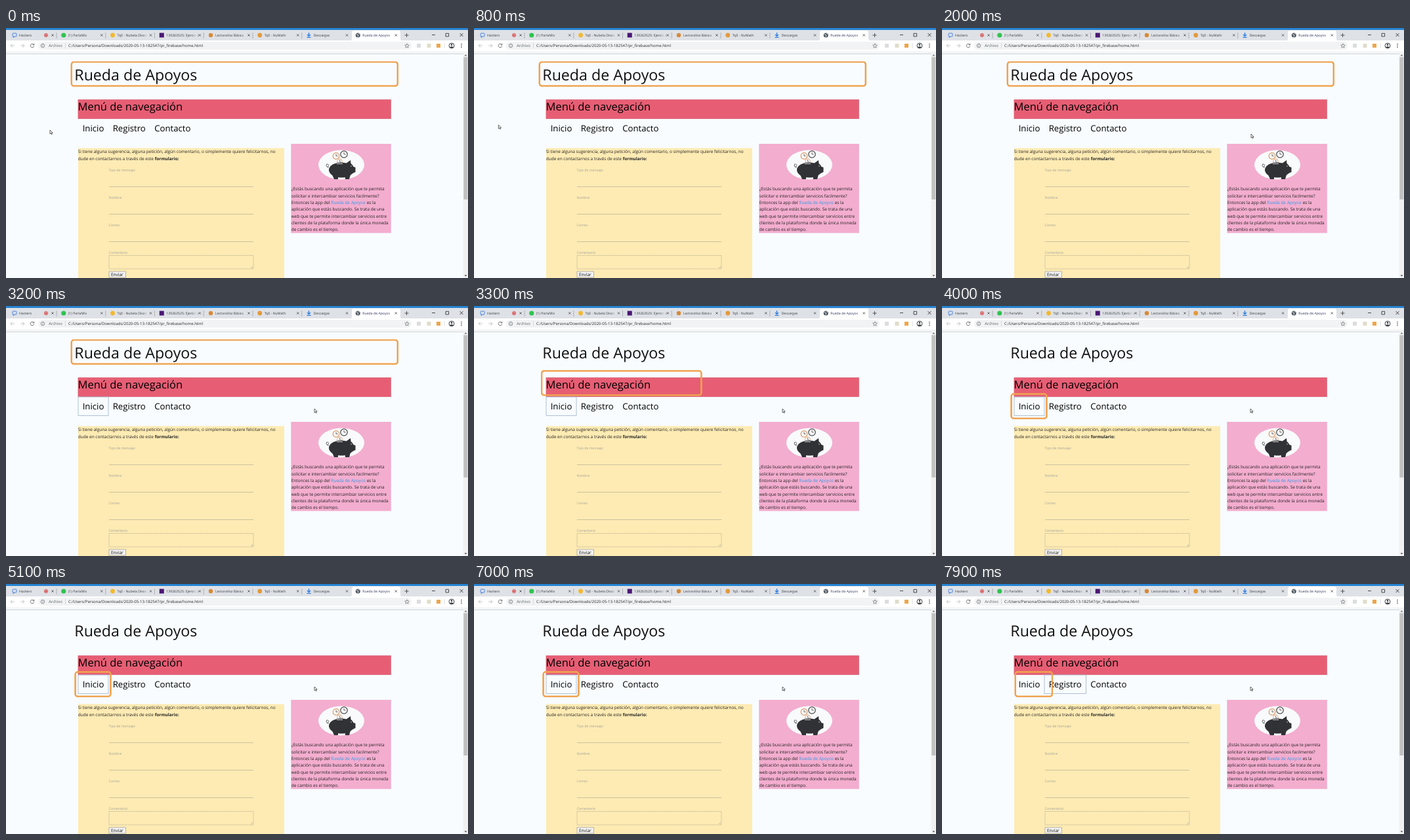
Animation of 704 by 382 pixels, one loop 8 s. Source, as an HTML page:

```html
<!DOCTYPE html>
<html lang="es">
<head>
<meta charset="utf-8">
<style>
  html, body { margin: 0; width: 100%; height: 100%; overflow: hidden; background: #f8fcff; }
  svg { display: block; width: 704px; height: 382px; }
  text { font-family: "Open Sans", "Noto Sans", sans-serif; text-rendering: geometricPrecision; white-space: pre; }
  #banner { filter: drop-shadow(0 .7px .7px #0005); }
  #ring { filter: drop-shadow(0 0 .6px #f0a351); }
</style>
</head>
<body>
<svg id="stage" viewBox="0 0 704 382" xmlns="http://www.w3.org/2000/svg"></svg>
<script>
const rect = (x, y, w, h, fill, extra = '') =>
  `<rect x="${x}" y="${y}" width="${w}" height="${h}" fill="${fill}" ${extra}/>`;
const circle = (x, y, r, fill, extra = '') =>
  `<circle cx="${x}" cy="${y}" r="${r}" fill="${fill}" ${extra}/>`;
const line = (d, color, width = 0.8, extra = '') =>
  `<path d="${d}" fill="none" stroke="${color}" stroke-width="${width}" ${extra}/>`;
const text = (x, y, size, str, fill = '#000') =>
  `<text x="${x}" y="${y}" font-size="${size}" fill="${fill}">${str}</text>`;

const APP = 'Rueda de Apoyos';

function tabStrip() {
  const titles = ['Hackers', '(1) ParlaMix', 'TqE - Nubela Disco', '139263525: Ejercicio',
    'LectoraVoz Básica', 'TqE - NuMath', 'Descargas', APP];
  const icons = [
    x => rect(x - 3, 8, 6, 5, 'none', 'rx="1" stroke="#4a86e0"') + line(`M${x - 2} 13v2l2-2`, '#4a86e0'),
    x => circle(x, 11, 3.6, '#2fc351'),
    x => circle(x, 11, 3.4, '#f2b92c'),
    x => rect(x - 3.5, 7.5, 7, 7, '#4a1673'),
    x => circle(x, 11, 3.2, '#d98936'),
    x => circle(x, 11, 3.4, '#e39a3c'),
    x => line(`M${x} 7v5M${x - 2.5} 10l2.5 2.5 2.5-2.5M${x - 3} 14.3h6`, '#2f7de0', 1.3),
    x => circle(x, 11, 3.6, '#555d66') + line(`M${x - 2.5} 9.5l2 .5 1 2-1 1.6M${x + 1} 8l1.5 1.6`, '#dde2e6', 1),
  ];
  let out = rect(0, 0, 704, 20, '#dee1e6') + rect(0, 0, 704, 3, '#2583d3') +
    `<path d="M523 20q4 0 4-4V7q0-3 3-3h68q3 0 3 3v9q0 4 4 4z" fill="#fff"/>`;
  titles.forEach((title, i) => {
    const x = 13 + i * 74.75, active = i === 7;
    out += icons[i](x) + text(x + 7, 13, 5.2, title, active ? '#33365f' : '#3a3d41') +
      rect(x + 47, 6, 8, 10, `url(#${active ? 'fadeOn' : 'fadeOff'})`) +
      line(`M${x + 56.4} 9.4l3.2 3.2m0-3.2l-3.2 3.2`, '#444', 0.8);
    if (i < 6) out += line(`M${x + 64} 7v9`, '#8c9196', 0.6);
  });
  return out + circle(61, 11, 2.7, 'none', 'stroke="#d93c3c" stroke-width=".8"') + circle(61, 11, 1.6, '#d93c3c') +
    line('M607.5 11h6M610.5 8v6', '#444', 0.9) +
    line('M649 10.5h5M670 8.3h4.6v4.6h-4.6zM691.5 8l5 5m0-5l-5 5', '#222', 0.8);
}

function toolbar() {
  const dots = [24.5, 27, 29.5].map(y => circle(694, y, 0.8, '#444')).join('');
  return rect(0, 19, 704, 18, '#fff') + rect(49, 21, 569, 12, '#f1f3f4', 'rx="6"') +
    line('M13 27H7.2m2.6-2.7L7 27l2.8 2.7M22 27h5.8m-2.6-2.7L28 27l-2.8 2.7', '#b4b7ba') +
    line('M42.2 25.3a2.8 2.8 0 1 0 .5 2.4M42.8 23.8v2.2h-2.2', '#555') +
    circle(56, 27, 2.8, 'none', 'stroke="#666" stroke-width=".7"') + line('M56 26.5v2M56 25v.8', '#666', 0.7) +
    text(65, 29.2, 6.05, 'Archivo', '#5c6064') + line('M90.5 23v8', '#c5c8ca', 0.6) +
    text(95, 29.2, 6.02, 'C:/Users/Persona/Downloads/2020-05-13-182547/pr_firebase/home.html', '#27292b') +
    line('M611 23.8l.9 2.2 2.4.2-1.8 1.6.5 2.3-2-1.2-2 1.2.5-2.3-1.8-1.6 2.4-.2z', '#555', 0.6) +
    rect(626, 24, 6, 6, '#dcdddf') + rect(641.5, 24, 6, 6, '#dfdcc9') + rect(656, 24, 6, 6, '#eea548') +
    line('M668 23v8', '#c5c8ca', 0.6) + circle(679, 27, 4, '#fff', 'stroke="#3f4347" stroke-width="1"') +
    circle(679, 25.7, 1.4, '#3f4347') + '<path d="M676 29.500q3-3 6 0-3 2.500-6 0z" fill="#3f4347"/>' + dots +
    line('M0 36.8H704', '#d8dbde', 0.6) + line('M0 39.5H697', '#b9bec2', 0.7);
}

function scrollbar() {
  return rect(696.5, 38, 7.5, 344, '#f1f1f1') + rect(697.3, 44.5, 6, 217.5, '#c1c1c1') +
    '<path d="M698.5 42.5l2-2 2 2z" fill="#666"/><path d="M698.5 377.5l2 2 2-2z" fill="#444"/>';
}

function form() {
  const labels = ['Tipo de mensaje:', 'Nombre', 'Correo', 'Comentario'];
  const rule = '#b9af95';
  return rect(110, 183.5, 314, 198.5, '#fdebb3') +
    text(109.7, 191.3, 6.5, 'Si tiene alguna sugerencia, alguna petición, algún comentario, o simplemente quiere felicitarnos, no', '#222') +
    text(109.7, 201.6, 6.5, 'dude en contactarnos a través de este <tspan font-weight="700">formulario:</tspan>', '#222') +
    labels.map((s, i) => text(156.5, 219 + 42 * i, 5.2, s, '#a3a09a') +
      (i < 3 ? line(`M157 ${242.5 + 42 * i}H377`, rule, 0.7) : '')).join('') +
    rect(157, 347.5, 220, 20.5, 'none', `stroke="${rule}" stroke-width=".8" stroke-dasharray="1.5 .8"`) +
    line('M373 367l3-3m-1.3 3l1.3-1.3', '#999', 0.5) +
    rect(157, 372, 25.5, 9, '#f2f2f2', 'stroke="#999" stroke-width=".7"') + text(160, 378.9, 6.5, 'Enviar', '#111');
}

function clock(x, y, r, color) {
  return circle(x, y, r, '#fafafa', `stroke="${color}" stroke-width="1.2"`) +
    line(`M${x} ${y - r * 0.6}V${y}h${r * 0.5}`, '#444', 0.8);
}

function piggyBank() {
  return clock(503, 195.5, 4.8, '#d99a68') + clock(515, 193, 5.2, '#444') + clock(508.5, 204, 3.8, '#e2b392') +
    '<ellipse cx="510.5" cy="217" rx="18.500" ry="11.500" fill="#303236"/>' +
    '<path d="M497 224h9v7h-6zM516 224h9l-2 7h-6zM518 207l7-5 .5 5q3 2 4 5l3 1v7l-4 2-4 3-8-8z" fill="#303236"/>' +
    line('M504 207.5h9', '#f8fafb', 0.8) + circle(526, 211, 0.7, '#f8fafb') +
    line('M492 213q-4 0-4-3t2.500-2 0 4', '#444', 0.8);
}

function aside() {
  const lines = ['¿Estás buscando una aplicación que te permita', 'solicitar e intercambiar servicios facilmente?',
    `Entonces la app del <tspan fill="#2f9be6">${APP}</tspan> es la`, 'aplicación que estás buscando. Se trata de una',
    'web que te permite intercambiar servicios entre', 'clientes de la plataforma donde la única moneda', 'de cambio es el tiempo.'];
  return rect(434.3, 177, 152.5, 136.3, '#f3adcf') +
    '<ellipse cx="511" cy="209" rx="35" ry="22.5" fill="#f8fafb"/>' + piggyBank() +
    lines.map((s, i) => text(434.7, 248.4 + 10.3 * i, 6.52, s, '#222')).join('');
}

const stage = document.getElementById('stage');
stage.innerHTML = `<defs>
  ${[['fadeOff', '#dee1e6'], ['fadeOn', '#fff']].map(([id, c]) => `<linearGradient id="${id}">
    <stop offset="0" stop-color="${c}" stop-opacity="0"/><stop offset=".8" stop-color="${c}"/></linearGradient>`).join('')}
  </defs>` +
  rect(0, 0, 704, 382, '#f8fcff') + tabStrip() + toolbar() + scrollbar() +
  text(104.3, 79.8, 23.2, APP, '#111') +
  rect(109.7, 109.3, 477, 29.5, '#e75e74', 'id="banner"') +
  text(109.5, 126, 16.5, 'Menú de navegación') +
  text(116.7, 158.3, 13.2, 'Inicio') + text(162.7, 158.3, 13.2, 'Registro') + text(226.2, 158.3, 13.2, 'Contacto') +
  form() + aside() +
  rect(0, 0, 0, 0, 'none', 'id="focus" stroke="#a9bad0" stroke-width=".9"') +
  rect(0, 0, 0, 0, 'none', 'id="ring" rx="3.5" stroke="#f0a351" stroke-width="2.2"') +
  '<path id="cursor" d="M0 0v5.800l1.400-1.200 1 2 .9-.4-.9-2h1.800z" fill="#fff" stroke="#222" stroke-width=".7"/>';

const [focus, ring, cursor] = ['focus', 'ring', 'cursor'].map(id => document.getElementById(id));
const setBox = (el, [x, y, width, height]) =>
  Object.entries({ x, y, width, height }).forEach(([k, v]) => el.setAttribute(k, v));
const clamp = v => Math.max(0, Math.min(1, v));
const mix = (a, b, k) => a.map((v, i) => v + (b[i] - v) * k);
const easeOut = (t, start) => 1 - (1 - clamp((t - start) / 300)) ** 3;

const TITLE = [99.8, 52, 497, 36.5], HOME = [105.6, 134.4, 53.8, 37.4], SIGNUP = [152, 134.4, 71.5, 37.4];
// time, x, y of the pointer tip
const PATH = [[0, 67, 156], [500, 36, 148], [1000, 38, 148], [1500, 280, 149],
  [1900, 471, 162], [2100, 471, 162], [2600, 470, 157]];

function pointerAt(t) {
  const i = PATH.findIndex(p => p[0] > t);
  if (i < 0) return PATH[PATH.length - 1].slice(1);
  const a = PATH[i - 1], b = PATH[i], k = (t - a[0]) / (b[0] - a[0]);
  return mix(a, b, k * k * (3 - 2 * k)).slice(1);
}

function draw(now) {
  const t = Math.floor(now % 8000 / 100) * 100;
  setBox(ring, t < 7800 ? mix(TITLE, HOME, easeOut(t, 3226)) : mix(HOME, SIGNUP, easeOut(t, 7886)));
  focus.setAttribute('visibility', t < 3100 ? 'hidden' : 'visible');
  setBox(focus, t < 7800 ? [110, 139, 46, 28.5] : [156, 139, 63.5, 28.5]);
  cursor.setAttribute('transform', `translate(${pointerAt(t)})`);
  requestAnimationFrame(draw);
}
requestAnimationFrame(draw);
</script>
</body>
</html>
```
